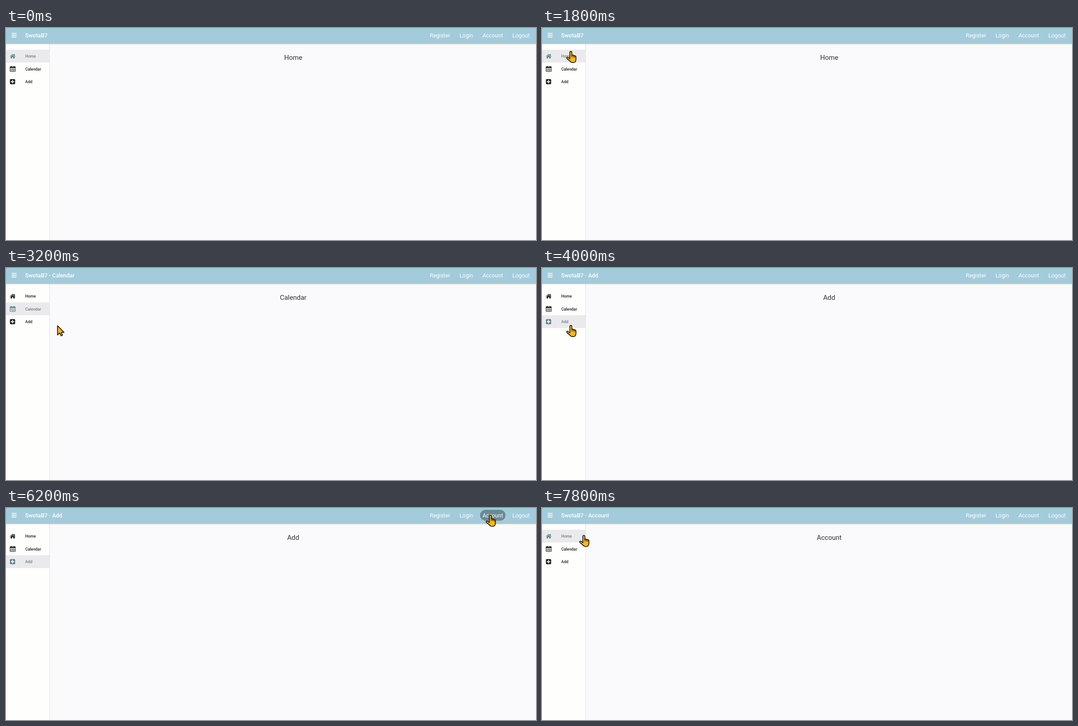
These frames come from a looping animation (1185x473 px, 8000 ms). An HTML page:

```html
<!DOCTYPE html>
<html lang="en">
<head>
<meta charset="utf-8">
<title>Study planner</title>
<style>
  html, body { margin: 0; width: 100%; height: 100%; overflow: hidden; background: #fafafc; }
  svg { display: block; width: 100vw; height: 100vh; font-family: Roboto, sans-serif; }
  .bar { fill: #a2ccdb; filter: drop-shadow(0 1.5px 1.6px rgba(0, 0, 0, .38)); }
  .title { font-size: 12.5px; font-weight: 500; fill: #fff; }
  .nav text { font-size: 12.4px; fill: #fff; text-anchor: end; }
  .nav rect { fill: #6a8a97; visibility: hidden; }
  .nav .on rect { visibility: visible; }
  .heading { font-size: 15px; fill: #303032; text-anchor: middle; }
  .row { color: #1b1d1e; }
  .row text { font-size: 8.9px; font-weight: 500; fill: currentColor; }
  .row .back { fill: #eaeaec; visibility: hidden; }
  .row.on { color: #62828d; }
  .row.on text { fill: #717d84; }
  .row.on .back { visibility: visible; }
  .pointer { fill: #fcb812; stroke: #111; stroke-width: 1.7; stroke-linejoin: round; stroke-linecap: round; }
</style>
</head>
<body>
<svg viewBox="0 0 1185 473">
  <rect width="1185" height="473" fill="#fafafc"/>
  <rect width="97.5" height="473" fill="#fefefd"/>
  <rect x="97" width="1" height="473" fill="#e1e1e3"/>
  <g id="rows"></g>
  <text id="heading" class="heading" x="642.2" y="71"></text>
  <rect class="bar" x="-6" y="-6" width="1197" height="40"/>
  <path d="M12.5 12.2h11M12.5 16.2h11M12.5 20.2h11" stroke="#fff" stroke-width="1.8"/>
  <text id="title" class="title" x="43" y="20.6"></text>
  <g id="nav" class="nav"></g>
  <path id="corner" d="M0 0h1.6L0 1.6z" fill="#45555c"/>
  <path id="arrow" class="pointer" d="M1 1V21.6L5.8 17.2 9 23.6 12.2 22 9.4 15.8H15.6Z"/>
  <g id="hand" class="pointer">
    <path d="M-2 13V3.2a2.2 2.2 0 0 1 4.4 0V9.5q2-1.2 3.4.6 2.2-.8 3.2.9 2.4-.3 2.6 2V19q-.2 7-6.5 7H3.6q-3 0-4.8-2.6L-8.6 16.8q-1.3-2 .6-2.8 1.8-.4 3.4 1.4L-2 17.5Z"/>
    <path d="M2.4 9.5v4M5.8 10.1v4M9 11v3.5" fill="none" stroke-width="1.3"/>
  </g>
</svg>
<script>
const LOOP = 8000, STEP = 200, ROW_TOP = 48.5, ROW_HEIGHT = 28.5, SIDE = 97.5;
const NAV_RIGHT = 1171, NAV_GAP = 21, PILL_PAD = 5.5, PILL_TOP = 4, PILL_HEIGHT = 24.3;
const BRAND = 'SwotaB7';
const $ = id => document.getElementById(id);

const icons = {
  Home: `<path fill="currentColor" d="M8.7 63 15 57.4l2.6 2.3v-1.6h1.8v3.2l1.9 1.7-.8.8L15 59l-5.5 4.8ZM10.4 64.1 15 60.1l4.6 4v4h-3.3v-3.3h-2.6v3.3h-3.3Z"/>`,
  Calendar: `<path fill="none" stroke="currentColor" d="M9.1 58.3h11.8v10.3H9.1Z"/>
    <path fill="currentColor" d="M8.7 57.8h12.6v2.7H8.7Z"/>
    <path stroke="currentColor" stroke-width=".65" d="M9 63.2h12M9 65.9h12M12 60v8.5M15 60v8.5M18 60v8.5"/>
    <path stroke="currentColor" stroke-width="1.7" d="M12 56.3v3M18 56.3v3"/>`,
  Add: `<rect x="8.8" y="57" width="11.6" height="11.6" rx="2" fill="currentColor"/>
    <path stroke="#fff" stroke-width="1.9" d="M10.8 62.8h7.6M14.6 59v7.6"/>`
};
const rowNames = Object.keys(icons);

$('rows').innerHTML = rowNames.map((name, i) => `
  <g class="row" transform="translate(0 ${i * ROW_HEIGHT})">
    <rect class="back" y="${ROW_TOP}" width="${SIDE}" height="${ROW_HEIGHT}"/>
    ${icons[name]}<text x="43" y="66">${name}</text>
  </g>`).join('');

$('nav').innerHTML = ['Register', 'Login', 'Account', 'Logout'].map(label => `
  <g><rect y="${PILL_TOP}" height="${PILL_HEIGHT}" rx="${PILL_HEIGHT / 2}"/><text y="20.6">${label}</text></g>`).join('');

// Lay the links out from the right edge.
let right = NAV_RIGHT;
const pills = [...$('nav').children].reverse().map(link => {
  const [pill, label] = link.children;
  const width = label.getComputedTextLength();
  const left = right - width - PILL_PAD;
  label.setAttribute('x', right);
  pill.setAttribute('x', left);
  pill.setAttribute('width', width + 2 * PILL_PAD);
  const span = { left, right: right + PILL_PAD };
  right -= width + NAV_GAP;
  return span;
}).reverse();

// Pointer strokes; a stroke that names a page starts with a click on it.
const origin = { x: 933, y: 395 };
const strokes = [
  { leave: 200, arrive: 1200, x: 107, y: 90, bend: -407 },
  { leave: 1200, arrive: 1800, x: 64.3, y: 51.2 },
  { leave: 1800, arrive: 2400, x: 64.3, y: 88 },
  { leave: 2800, arrive: 3200, x: 114.2, y: 127.8, page: 'Calendar' },
  { leave: 3200, arrive: 3600, x: 64.3, y: 127.2 },
  { leave: 4000, arrive: 5000, x: 1062.8, y: 37.3, bend: 285, page: 'Add' },
  { leave: 5000, arrive: 5200, x: 1010, y: 16 },
  { leave: 5200, arrive: 5800, x: 1082.6, y: 15 },
  { leave: 6400, arrive: 7200, x: 435, y: 124, bend: 150, page: 'Account' },
  { leave: 7200, arrive: 7800, x: 93.3, y: 60 }
];
const ease = s => s * s * (3 - 2 * s);

function pointerAt(t) {
  const i = strokes.findLastIndex(stroke => stroke.leave <= t);
  if (i < 0) return null;
  const to = strokes[i], from = strokes[i - 1] || origin;
  const s = ease(Math.min(1, (t - to.leave) / (to.arrive - to.leave)));
  const mix = key => from[key] + (to[key] - from[key]) * s;
  return { x: mix('x'), y: mix('y') + 2 * s * (1 - s) * (to.bend || 0) };
}

function place(node, shown, point) {
  node.style.display = shown ? '' : 'none';
  if (shown) node.setAttribute('transform', `translate(${point.x} ${point.y})`);
}

function highlight(group, test) {
  [...group.children].forEach((item, i) => item.classList.toggle('on', test(i)));
}

function render(t) {
  const page = strokes.findLast(stroke => stroke.page && stroke.leave <= t)?.page || 'Home';
  const point = pointerAt(t);
  const row = point && point.x < SIDE ? Math.floor((point.y - ROW_TOP) / ROW_HEIGHT) : -1;
  const inBar = point && point.y > PILL_TOP && point.y < PILL_TOP + PILL_HEIGHT;
  const link = inBar ? pills.findIndex(pill => point.x >= pill.left && point.x <= pill.right) : -1;
  const hovering = row in rowNames || link >= 0;

  $('title').textContent = page === 'Home' ? BRAND : `${BRAND} - ${page}`;
  $('heading').textContent = page;
  highlight($('rows'), i => i === row || rowNames[i] === page);
  highlight($('nav'), i => i === link);
  $('corner').style.display = t >= 1400 ? '' : 'none';
  place($('arrow'), point && !hovering, point);
  place($('hand'), point && hovering, point);
}

const start = performance.now();
function tick() {
  const t = (performance.now() - start) % LOOP;
  render(Math.floor(t / STEP) * STEP);
  requestAnimationFrame(tick);
}
tick();
</script>
</body>
</html>
```
